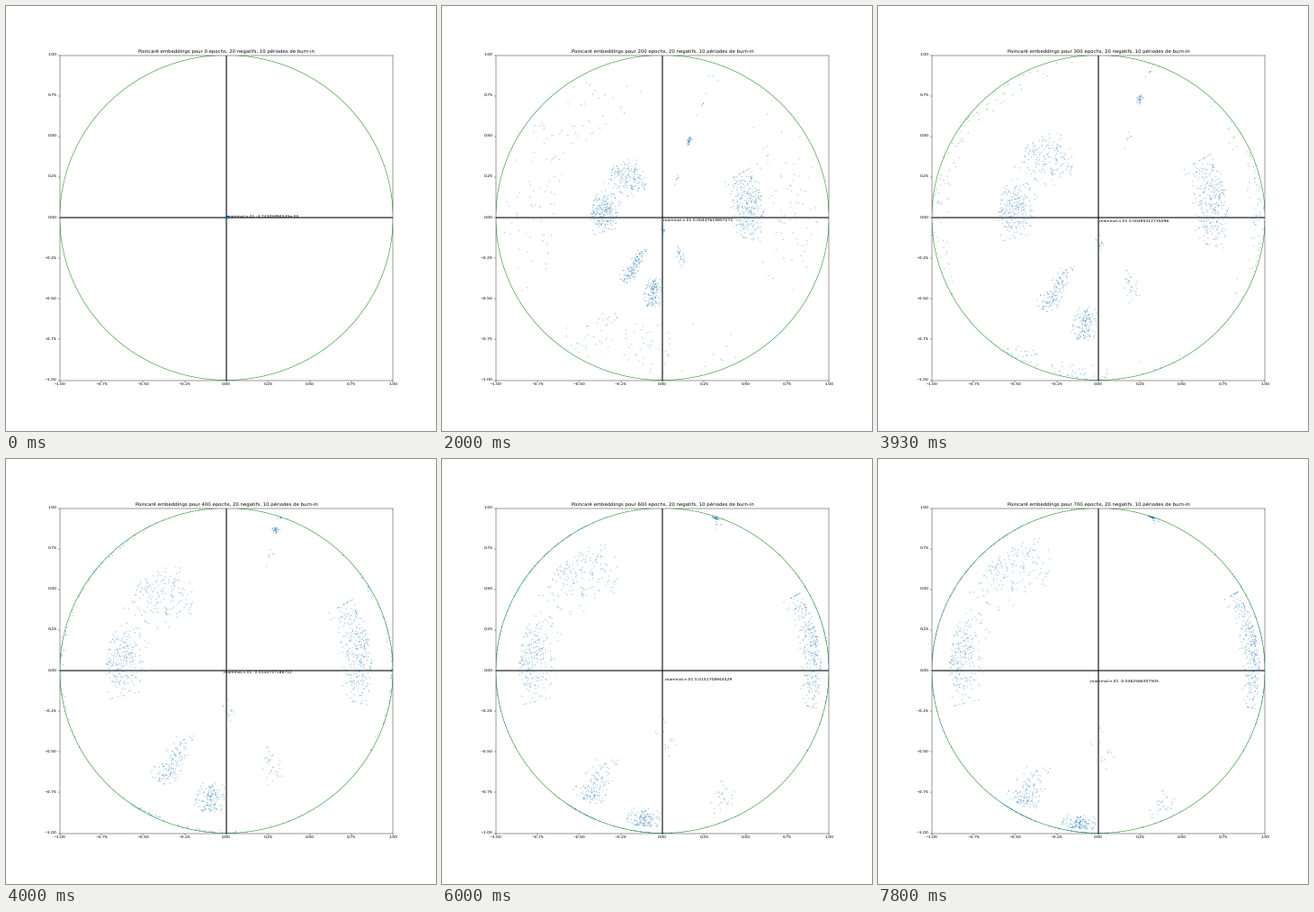
A matplotlib script that plays this animation: 478 px wide and 472 px high, repeating every 8000 ms.

```python
import numpy as np
import matplotlib.pyplot as plt
from matplotlib.animation import FuncAnimation
from matplotlib.patches import Circle

W, H, DPI = 478, 472, 32
plt.rcParams.update({"font.family": "DejaVu Sans", "font.size": 10.1,
                     "text.hinting": "none"})
rng = np.random.default_rng(7)

TITLE = "Poincaré embeddings pour {} epochs, 20 negatifs, 10 périodes de burn-in"

# Root node per 100 epochs: its x coordinate, as printed, and its y
ROOT = [
    ("-4.74305894545e-05", 0), ("0.00212874306591", -.01),
    ("0.00437619857272", -.02), ("0.00485312735096", -.026),
    ("-0.0144747186712", -.016), ("-0.00413752152431", -.077),
    ("0.0151708944429", -.059), ("-0.0462566357505", -.074),
]

# Branches at 400 epochs: count, direction, fan (degrees), inner and outer radius
BRANCHES = [
    (310, 8, 11, .68, .88),
    (34, 71, .7, .89, .93),
    (7, 70.5, 1.5, .60, .82),
    (170, 130, 9, .38, .76),
    (240, 174, 10, .48, .73),
    (145, 240, 3, .42, .80),
    (145, 263, 3, .68, .88),
    (16, 272, 4, .10, .32),
    (30, 294, 3, .50, .75),
]
LEAF_PACE = 1.7


def growth(step):
    """Hyperbolic radius after step * 100 epochs, relative to 400 epochs."""
    return np.sin(.15 * max(step, .03)) / np.sin(.6)


def directions(n, mid, fan):
    return np.radians(mid + fan * np.clip(rng.normal(size=n), -2, 2))


def grow_branch(n, mid, fan, r0, r1):
    """Angle, depth at 400 epochs and pace of a branch and its outer leaves."""
    r = r0 + (r1 - r0) * rng.beta(2.3, 1.5, n)
    pace = 2.6 - .28 * np.log(n)  # small branches drift outwards faster
    branch = directions(n, mid, fan), np.arctanh(r), np.full(n, pace)

    m = n // 4
    rim = np.arctanh(rng.uniform(.65, .97, m)) / growth(2) ** LEAF_PACE
    leaves = directions(m, mid, 1.7 * fan), rim, np.full(m, LEAF_PACE)
    return np.hstack([branch, leaves])


angle, depth, pace = np.hstack([grow_branch(*b) for b in BRANCHES])

fig = plt.figure(figsize=(W / DPI, H / DPI), dpi=DPI, facecolor="white")
ax = fig.add_axes([59.8 / W, 56.5 / H, 370.4 / W, 361 / H])
ax.set(xlim=(-1, 1), ylim=(-1, 1))
ticks = np.linspace(-1, 1, 9)
ax.set_xticks(ticks)
ax.set_yticks(ticks)
ax.tick_params(axis="x", pad=5)
for spine in ax.spines.values():
    spine.set_linewidth(.9)
ax.axhline(0, color="black", lw=2.4, snap=False)
ax.axvline(0, color="black", lw=2.4, snap=False)
ax.add_patch(Circle((0, 0), 1, fill=False, ec="green", lw=1.1))
start = np.zeros(len(angle) + 1)
# One size per dot keeps sub-pixel positions
dots = ax.scatter(start, start, s=np.full(len(start), 8), color="C0",
                  alpha=.45, linewidths=0, zorder=3)
title = ax.set_title("", fontsize=12.2)
label = ax.text(0, 0, "", zorder=4)


def draw(step):
    value, ly = ROOT[step]
    lx = float(value)
    r = np.tanh(depth * growth(step) ** pace)
    x = np.append(r * np.cos(angle), lx)
    y = np.append(r * np.sin(angle), ly)
    dots.set_offsets(np.column_stack([x, y]))
    label.set_position((lx, ly))
    label.set_text("mammal.n.01 " + value)
    title.set_text(TITLE.format(100 * step))
    return dots, label, title


anim = FuncAnimation(fig, draw, frames=8, interval=1000, repeat=True,
                     repeat_delay=0, init_func=lambda: draw(0))
plt.show()
```
